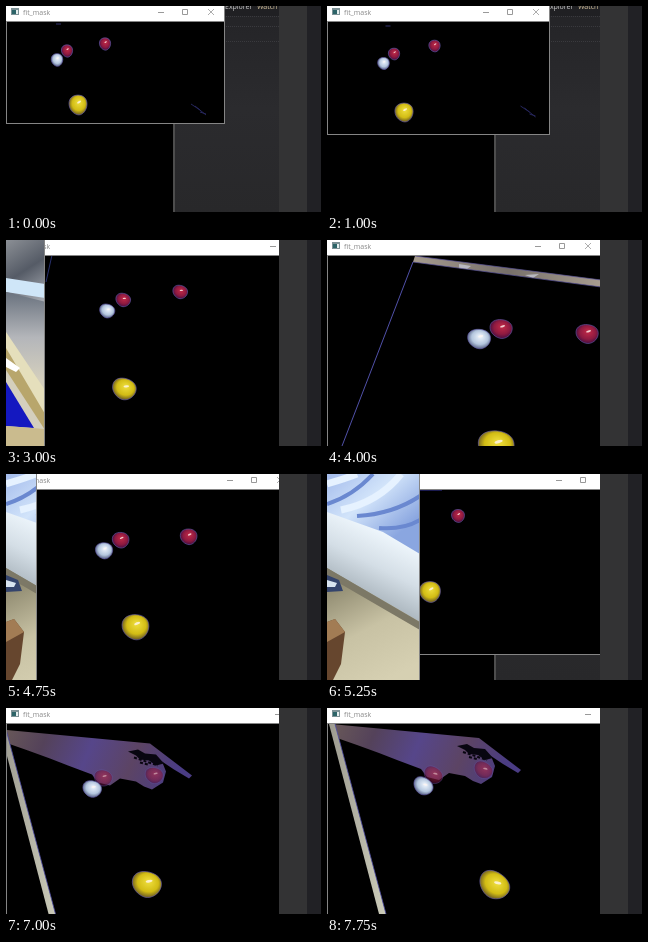
An HTML page with a canvas that plays this animation: 315x206 px, repeating every 8000 ms.

```html
<!DOCTYPE html>
<html>
<head>
<meta charset="utf-8">
<style>
html, body { margin: 0; width: 100%; height: 100%; overflow: hidden; background: #000; }
canvas { display: block; }
</style>
</head>
<body>
<canvas width="315" height="206"></canvas>
<script>
const c = document.querySelector('canvas').getContext('2d');
const LOOP = 8000, STEP = 250, BAR = 15, PANEL = 273;

// time, window width, window height
const windowTrack = [
  [0, 218, 117], [1250, 223, 131], [2000, 244, 166], [3000, 330, 230],
  [4000, 274, 260], [5250, 295, 180], [6250, 345, 230], [7750, 324, 250]
];
// time, width of the camera view that covers the left side
const cameraTrack = [
  [0, 0], [2500, 0], [3000, 39], [3500, 0], [4500, 0], [5250, 93], [6250, 28], [6750, 0]
];
// time, x/y of white, red, red, yellow, then size, squash, tilt
const ballTrack = [
  [0, 51, 54, 61, 45, 99, 38, 72, 99, 9, 1.1, 0],
  [2000, 62, 61, 73, 51, 116, 42, 82, 114, 9.2, .97, 0],
  [3000, 101, 71, 117, 60, 174, 52, 118, 149, 12, .88, .3],
  [4000, 152, 99, 174, 89, 260, 94, 169, 206, 18, .84, .1],
  [5250, 62, 62, 75, 51, 131, 42, 103, 118, 10.4, 1, 0],
  [6250, 76, 84, 88, 73, 140, 73, 114, 176, 13.5, .92, -.1],
  [7750, 96, 78, 106, 67, 156, 62, 167, 177, 16, .8, .6]
];

function sample(track, t) {
  let i = track.length - 1;
  while (track[i][0] > t) i--;
  const a = track[i], b = track[i + 1];
  if (!b) return a.slice(1);
  const k = (t - a[0]) / (b[0] - a[0]);
  return a.map((v, j) => v + (b[j] - v) * k).slice(1);
}

function rect(x, y, w, h, color) {
  c.fillStyle = color;
  c.fillRect(x, y, w, h);
}

function fill(d, color) {
  c.fillStyle = color;
  c.fill(new Path2D(d));
}

function stroke(d, color, width = 1, dash = []) {
  c.strokeStyle = color;
  c.lineWidth = width;
  c.setLineDash(dash);
  c.stroke(new Path2D(d));
  c.setLineDash([]);
}

function text(s, x, y, color) {
  c.font = '7px "Open Sans", sans-serif';
  c.fillStyle = color;
  c.fillText(s, x, y);
}

function gradient(x0, y0, x1, y1, ...colors) {
  const g = c.createLinearGradient(x0, y0, x1, y1);
  colors.forEach((color, i) => g.addColorStop(i / (colors.length - 1), color));
  return g;
}

function clipped(x, y, w, h, draw) {
  c.save();
  c.beginPath();
  c.rect(x, y, w, h);
  c.clip();
  draw();
  c.restore();
}

function desktop(t) {
  rect(0, 0, 315, 206, '#000');
  rect(168, 0, 106, 206, gradient(0, 0, 0, 206, '#242427', '#2b2b2e', '#28282a'));
  rect(168, 0, 106, 10, '#202023');
  for (const y of [10, 20, 35]) stroke(`M168 ${y + .5}H273`, '#3a3a3e', 1, [1, 1]);
  text('Explorer', 219, 3, '#d0d0d0');
  text('Watch', 251, 3, '#d8c6a0');
  rect(PANEL, 0, 28, 206, '#333334');
  rect(301, 0, 14, 206, '#212125');
  rect(167, 110, 2, 96, '#4d4d4d');
  if (t >= 1500 && t <= 2250) stroke('M93 198l2 1l3 7', '#eee', 1.3);
}

function ball(x, y, r, squash, tilt, [light, mid, dark]) {
  c.save();
  c.translate(x, y);
  c.rotate(tilt);
  c.scale(r, r * squash);
  const g = c.createRadialGradient(.1, -.3, 0, .05, -.1, 1.1);
  g.addColorStop(0, light);
  g.addColorStop(.65, mid);
  g.addColorStop(1, dark);
  // slightly narrower towards the bottom
  const egg = 'M-1 -.15C-1 -.7 -.55 -1 0 -1S1 -.7 1 -.1C1 .5 .55 1 .1 1S-1 .55 -1 -.15Z';
  fill(egg, g);
  stroke(egg, '#6a60b4aa', .9 / r);
  c.beginPath();
  c.ellipse(.12, -.3, .24, .1, -.5, 0, 7);
  c.fillStyle = '#fff5f0cc';
  c.fill();
  c.restore();
}

const white = ['#f2f8ff', '#b4c6de', '#5a6488'];
const red = ['#c42a48', '#8e1a40', '#460e42'];
const yellow = ['#f0e040', '#d2bc14', '#6a5a24'];

// Table edges left visible by the mask: start, end, drawing
const edges = [
  [0, 1000, () => {
    stroke('M185 98l9 6M189 100l11 9M194 106l6 2', '#26265c');
    stroke('M50 18h5', '#30306c');
  }],
  [1500, 2250, () => stroke('M2 165L60 157L142 148', '#4646a0', 1, [3, 2])],
  [2750, 3000, () => stroke('M46 15L40 42', '#28306e')],
  [3250, 4500, () => {
    fill('M88 16L274 40V47L86 22Z', gradient(87, 0, 274, 0, '#a59b8e', '#77706a', '#a89d90'));
    fill('M132 24l12 2l-4 3l-8 -1ZM198 35l14 -1l-6 4Z', '#b8b8c0');
    stroke('M88 16L274 40M86 22L274 47', '#5a549a', .7);
    stroke('M86 22L15 206', '#5050a8', 1);
  }],
  [5000, 5250, () => {
    stroke('M80 16H115', '#3434a0');
    stroke('M121 15.5H144', '#66666a');
  }],
  [5500, 6750, () => {
    stroke('M0 15L28 19.5L154 37.5', '#6a60c8', 1.6);
    stroke('M0 14L28 18.5L154 36.5', '#d0c8d0', .8);
    fill('M152 37L156 37L274 163V172Z', '#6860cc');
    stroke('M154.5 37L274 165', '#b8b0b8', 1.4);
  }],
  [7000, 7750, () => {
    fill('M4 16L152 30L194 62L191 65L176 56L164 48L168 58L165 69L154 76L146 73L138 68L122 65L112 72L100 69L94 61L70 52L52 45L30 37L10 30Z',
      gradient(5, 10, 170, 80, '#6a5a58', '#54425a', '#56468a', '#5c4464', '#4a3c84'));
    fill('M130 38l10 -2l7 4l11 1l8 9l-8 2l-7 -5l-9 -1l-4 -4Z', '#080610');
    stroke('M136 44l24 8M142 49l8 2', '#080610', 2, [3, 2]);
    fill('M2 16H8L59 206H52Z', gradient(2, 0, 59, 0, '#9c9a90', '#ccccba'));
    stroke('M8 16L59 206', '#4a48a0', .8);
  }]
];

function maskWindow(t) {
  const [w, h] = sample(windowTrack, t);
  const right = Math.round(w), bottom = Math.round(h);
  const b = sample(ballTrack, t), [size, squash, tilt] = b.slice(8);
  clipped(0, 0, PANEL, 206, () => {
    rect(0, 0, right + 1, bottom + 1, '#858585');
    rect(1, 0, right - 1, bottom, '#000');
    rect(0, 0, right, BAR, '#fff');
    rect(5, 2, 8, 7, '#7d9296');
    rect(6, 4, 4, 4, '#2c6468');
    rect(10, 4, 2, 4, '#e4eeee');
    text('fit_mask', 17, 9, '#888');
    stroke(`M${right - 66} 6.5h6`, '#999');
    stroke(`M${right - 41.5} 3.5h5v5h-5Z`, '#999');
    stroke(`M${right - 16} 3l6 6m0 -6l-6 6`, '#999', .8);
    rect(0, BAR, right, 1, '#858585');
  });
  clipped(1, BAR + 1, Math.min(right, PANEL) - 1, Math.min(bottom, 206) - BAR - 1, () => {
    for (const [start, end, draw] of edges) {
      if (t < start || t > end) continue;
      // edges travel with the far red ball
      const key = ballTrack.reduce((p, q) =>
        q[0] >= start && q[0] <= end ? q : p);
      c.save();
      c.translate(b[4] - key[5], b[5] - key[6]);
      draw();
      c.restore();
    }
    if (t >= 7000) c.globalAlpha = .55;
    ball(b[4], b[5], size * .62, squash, tilt, red);
    ball(b[2], b[3], size * .62, squash, tilt, red);
    c.globalAlpha = 1;
    ball(b[0], b[1], size * .64, squash, tilt, white);
    ball(b[6], b[7], size, squash, tilt, yellow);
  });
}

function bedroom() {
  rect(0, 0, 93, 206, gradient(0, 0, 39, 60, '#8b8f95', '#555b66', '#a9adb4'));
  fill('M0 38L39 44V58L0 52Z', '#cfe6f8');
  fill('M0 52L93 75V206H0Z', gradient(0, 55, 0, 140, '#6e7682', '#b4b6ba', '#d4cfbd'));
  fill('M0 92L39 150V188L0 118Z', '#e5dfbc');
  fill('M0 108L39 174V190L0 130Z', '#b8a66c');
  fill('M0 118L14 128L10 132L0 127Z', '#fff');
  fill('M0 142L28 188L0 186Z', '#1418c0');
  fill('M0 186L39 189V206H0Z', '#cabb8e');
}

function bed() {
  rect(0, 0, 93, 206, gradient(10, 110, 60, 206, '#8f8a70', '#c8c2a4', '#d6d0b2'));
  fill('M0 30L50 50L93 78V148L0 94Z', gradient(50, 55, 20, 115, '#eef6fc', '#d4dee6', '#a9b4bc'));
  fill('M0 94L93 148V156L0 102Z', '#7c7866');
  fill('M0 0H93V80L56 58L0 38Z', gradient(0, 0, 60, 70, '#a4bcec', '#d2e4fa', '#8aa6e0'));
  stroke('M0 30Q26 22 46 0M30 42Q66 40 93 22M52 54Q76 56 93 46', '#6a88d0', 4);
  stroke('M0 10Q20 4 30 0M14 36Q52 28 74 0', '#e6f2ff', 7);
  fill('M0 101L12 106L16 117L0 118Z', '#34446c');
  fill('M0 106L10 109L8 113H0Z', '#d8e4f0');
  fill('M0 148L8 145L18 158L14 190L6 206H0Z', '#66462e');
  fill('M0 148L8 145L18 158L0 168Z', '#a27c54');
}

function pillow() {
  rect(0, 0, 93, 206, gradient(0, 0, 0, 206, '#180c20', '#3a3044', '#6c6c80', '#54504c'));
  fill('M0 50L27 70V112L0 80Z', '#8a8ca0');
  fill('M0 78L27 110V150L0 120Z', gradient(0, 80, 0, 150, '#b8cce4', '#f0faff', '#a8c8ec'));
  fill('M0 118L27 150V174L0 146Z', '#8ea4c0');
  fill('M0 146L27 176V206H0Z', gradient(0, 150, 27, 200, '#e0dcc0', '#9c9274', '#50483c'));
}

function camera(t) {
  const width = Math.round(sample(cameraTrack, t)[0]);
  if (width < 1) return;
  clipped(0, 0, width, 206, t < 4000 ? bedroom : t < 5750 ? bed : pillow);
  rect(width - 1, 0, 1, 206, '#858585');
}

function frame(now) {
  const t = Math.floor(now % LOOP / STEP) * STEP;
  desktop(t);
  maskWindow(t);
  camera(t);
  requestAnimationFrame(frame);
}
frame(0);
</script>
</body>
</html>
```
